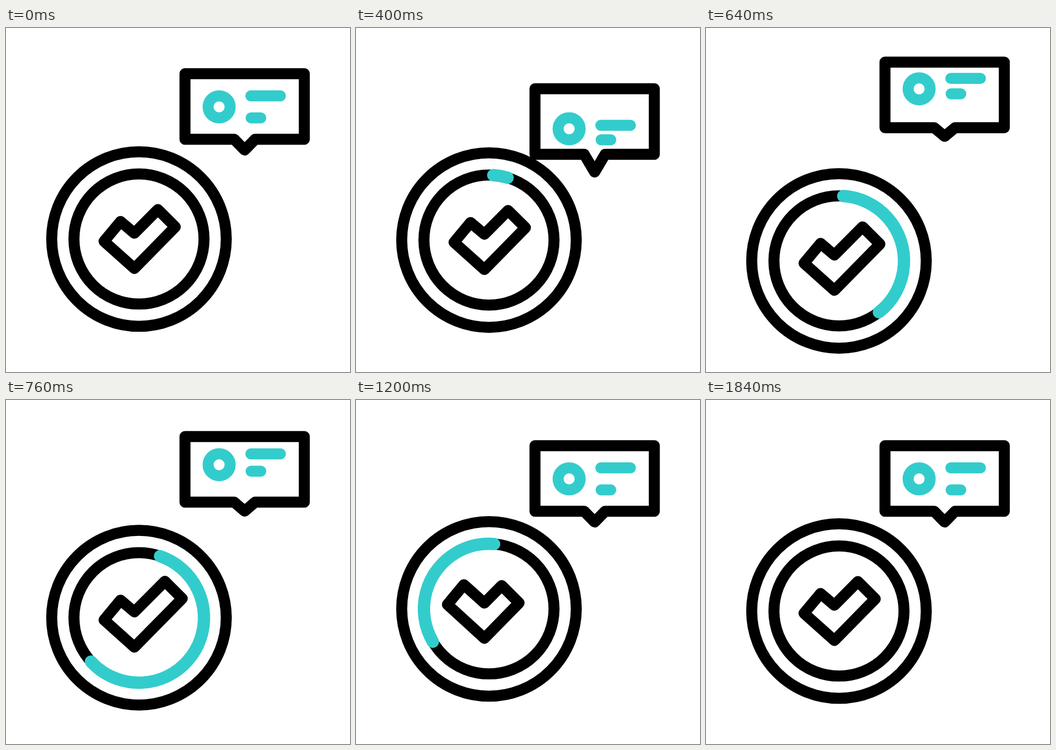
An HTML page with a canvas that plays this animation: 640 px wide and 640 px high, repeating every 2 s.

```html
<!DOCTYPE html>
<html lang="en">
<head>
<meta charset="utf-8">
<title>Coin and message</title>
<style>
  html, body { margin: 0; width: 100%; height: 100%; overflow: hidden; background: #fff; }
  canvas { display: block; width: 100vmin; height: 100vmin; }
</style>
</head>
<body>
<canvas id="stage" width="640" height="640"></canvas>
<script>
const ctx = document.getElementById('stage').getContext('2d');
const LOOP = 2000, STEP = 40;
const BLACK = '#000', TEAL = '#33cccc';
const LINE = 20.5;

// Smooth interpolation through [time, value] keys.
function track(t, keys) {
  if (t <= keys[0][0]) return keys[0][1];
  for (let i = 1; i < keys.length; i++) {
    const [t0, v0] = keys[i - 1], [t1, v1] = keys[i];
    if (t < t1) return v0 + (v1 - v0) * (1 - Math.cos(Math.PI * (t - t0) / (t1 - t0))) / 2;
  }
  return keys[keys.length - 1][1];
}

function stroke(color, width = LINE) {
  ctx.strokeStyle = color;
  ctx.lineWidth = width;
  ctx.stroke();
}

function poly(points, color, closed) {
  ctx.beginPath();
  points.forEach(([x, y]) => ctx.lineTo(x, y));
  if (closed) ctx.closePath();
  stroke(color);
}

function ring(x, y, r, color) {
  ctx.beginPath();
  ctx.arc(x, y, r, 0, Math.PI * 2);
  stroke(color);
}

function drawBubble(t) {
  const bob = (down, up) => track(t, [[100, 0], [394, down], [675, -up], [915, 0]]);
  const box = bob(28, 23.5);
  const top = 85 + box, bottom = 207 + box;
  poly([[333, top], [555, top], [555, bottom], [463.5, bottom],
        [444, 227 + bob(41, 28)], [424.5, bottom], [333, bottom]], BLACK, true);

  ring(396.5, 146.7 + bob(41, 36.5), 20.5, TEAL);
  const y1 = 126.2 + bob(55, 36), y2 = 167.2 + bob(41, 48);
  poly([[455.5, y1], [510.5, y1]], TEAL);
  poly([[456, y2], [474, y2]], TEAL);
}

function drawCheck(t) {
  const r = track(t, [[351, 0], [867, 14.5], [1279, -14], [1825, 0]]);
  const l = track(t, [[850, 0], [1300, 14], [1825, 0]]);
  poly([[-65 - l, 4.2 - l], [-34.3 - l, -32.6 - l], [-8.5, -10.8],
        [35.2 + r, -54.8 - r], [67.5 + r, -22.6 - r], [-8.5, 54.8]], BLACK, true);
}

function drawArc(t) {
  if (t <= 305 || t >= 1840) return;
  const from = track(t, [[650, 3.8], [1380, 279]]);
  const to = track(t, [[305, 3.8], [1093, 364.5]]);
  const rad = deg => (deg - 90) * Math.PI / 180;
  ctx.beginPath();
  ctx.arc(0, 0, 121, rad(from), rad(to));
  stroke(TEAL, 23);
}

function drawCoin(t) {
  const y = track(t, [[365, 0], [618, 41.5], [955, -35.5], [1268, 0]]);
  ctx.save();
  ctx.translate(247.4, 392.6 + y);
  ring(0, 0, 162.4, BLACK);
  ring(0, 0, 121, BLACK);
  drawArc(t);
  drawCheck(t);
  ctx.restore();
}

function draw(t) {
  ctx.fillStyle = '#fff';
  ctx.fillRect(0, 0, 640, 640);
  ctx.lineCap = ctx.lineJoin = 'round';
  drawBubble(t);
  drawCoin(t);
}

const begin = performance.now();
function tick() {
  const t = (performance.now() - begin) % LOOP;
  draw(Math.floor(t / STEP) * STEP);
  requestAnimationFrame(tick);
}
tick();
</script>
</body>
</html>
```
